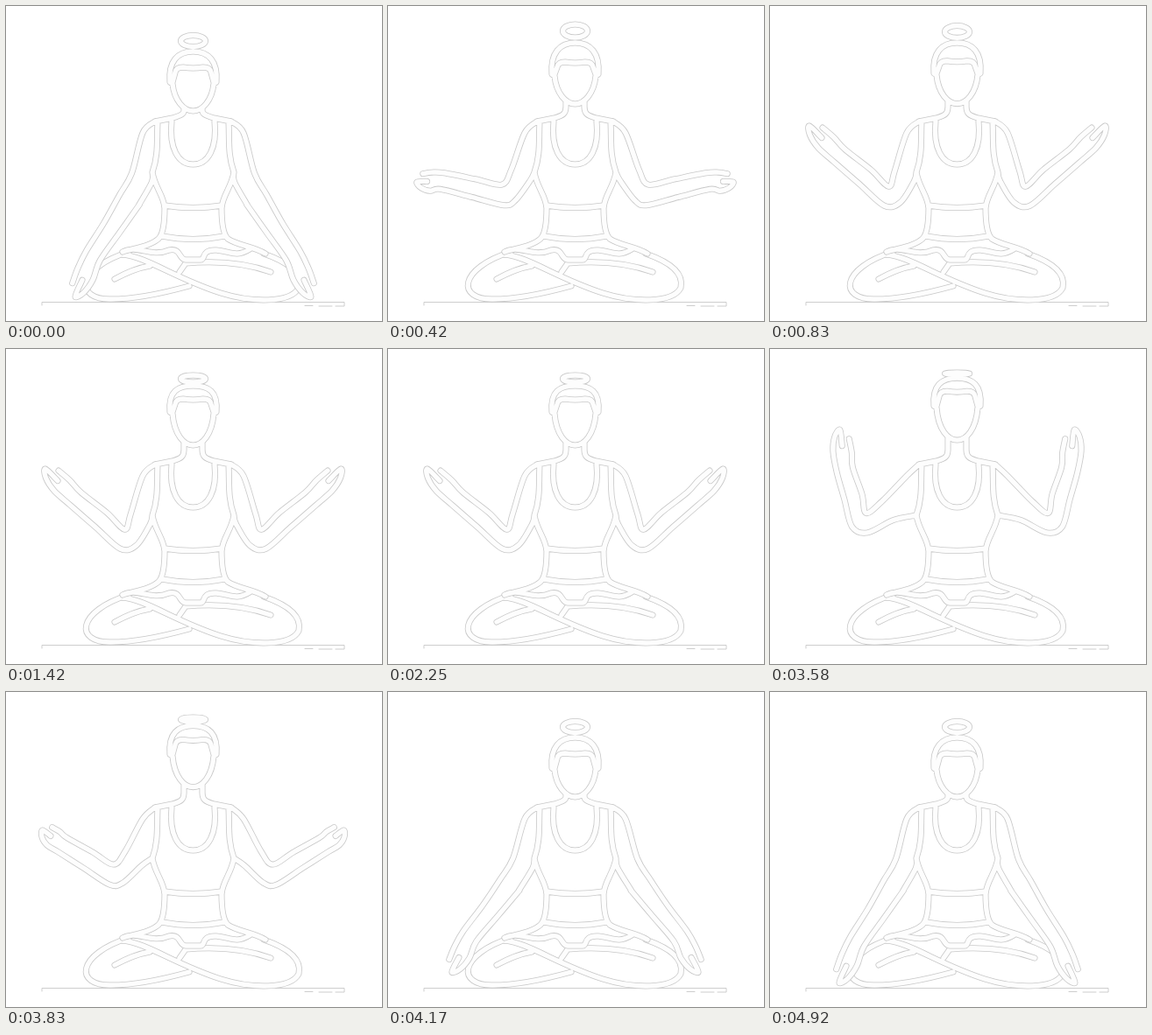
Animation, 429 px wide and 360 px high, one loop 5 s. Source, as an HTML page with a canvas:

```html
<!DOCTYPE html>
<html lang="en">
<head>
<meta charset="utf-8">
<title>Seated meditation</title>
<style>
html, body { margin: 0; width: 100%; height: 100%; overflow: hidden; background: #fff; }
canvas { display: block; }
</style>
</head>
<body>
<canvas id="stage" width="429" height="360"></canvas>
<script>
const ctx = document.getElementById('stage').getContext('2d');
const LOOP = 5000, STEP = LOOP / 60;
const EDGE = '#c8c8c8', FILL = '#fdfdfd';
const MIRROR = new DOMMatrix([-1, 0, 0, 1, 427, 0]);

// Arm poses: elbow, wrist, fingertip.
const lowered = [141,222, 99,285, 79,332];
const resting = [139,221, 93,279, 73,320];
const spread = [135,216, 62,199, 33,200];
const wide = [133,215, 58,199, 29,200];
const open = [138,219, 80,171, 45,137];
const lifted = [104,199, 86,137, 81,91];

// Head poses: bun, bun radius, crown, ear, hairline, chin.
const level = [40, 6.5, 52, 87, 70, 120];
const raised = [28.5, 7.5, 42, 78, 64, 112];
const tilted = [34, 4, 42, 72, 57, 110];
const back = [28, 1, 33, 65, 48, 104];

const armKeys = [[0, lowered], [60, lowered], [420, spread], [650, open], [3000, open],
  [3560, lifted], [3840, wide], [4170, resting], [4600, lowered], [LOOP, lowered]];
const headKeys = [[0, level], [60, level], [420, raised], [580, raised], [1220, tilted],
  [3000, tilted], [3540, back], [4130, level], [LOOP, level]];

// Monotone cubic interpolation: smooth through keys, no overshoot.
function track(keys, time) {
  let k = 0;
  while (time >= keys[k + 1][0]) k++;
  const [t0, a] = keys[k], [t1, b] = keys[k + 1];
  const span = t1 - t0, u = (time - t0) / span;
  const slope = (j, i) => keys[j] && keys[j + 1]
    ? (keys[j + 1][1][i] - keys[j][1][i]) / (keys[j + 1][0] - keys[j][0]) : 0;
  const tangent = (p, q) => p * q > 0 ? 2 * p * q / (p + q) : 0;
  return a.map((v, i) => {
    const s = slope(k, i);
    const m0 = tangent(slope(k - 1, i), s) * span;
    const m1 = tangent(s, slope(k + 1, i)) * span;
    return v + (b[i] - v) * u * u * (3 - 2 * u) + m0 * u * (1 - u) ** 2 - m1 * u * u * (1 - u);
  });
}

// SVG path data for a smooth curve through points.
function curve(points) {
  const at = i => points[Math.min(points.length - 1, Math.max(0, i))];
  let d = `M${points[0]}`;
  for (let i = 0; i < points.length - 1; i++) {
    const near = at(i).map((v, c) => v + (at(i + 1)[c] - at(i - 1)[c]) / 6);
    const far = at(i + 1).map((v, c) => v - (at(i + 2)[c] - at(i)[c]) / 6);
    d += `C${near} ${far} ${at(i + 1)}`;
  }
  return d;
}

// A bone gives points at a share of its length, pushed sideways by an offset.
function bone([x0, y0], [x1, y1]) {
  const dx = x1 - x0, dy = y1 - y0, length = Math.hypot(dx, dy);
  return (share, offset) => [
    x0 + dx * share - dy / length * offset,
    y0 + dy * share + dx / length * offset
  ];
}

function armLines([ex, ey, wx, wy, tx, ty]) {
  const elbow = [ex, ey], wrist = [wx, wy], tip = [tx, ty];
  const upper = bone([167, 162], elbow), fore = bone(elbow, wrist), hand = bone(wrist, tip);
  // Both bones' outer sides meet 13 px from the elbow, on the bisector.
  const a = upper(1, 1), b = fore(0, 1);
  const nx = a[0] + b[0] - 2 * ex, ny = a[1] + b[1] - 2 * ey;
  const reach = 13 / Math.hypot(nx, ny);
  const crook = [ex + nx * reach, ey + ny * reach];
  return {
    outer: [[170, 132], [156, 145], upper(0.55, 10), crook,
      fore(0.5, 10), fore(1, 9), hand(0.4, 10), hand(0.75, 9)],
    inner: [[167, 190], upper(0.55, -15), upper(1, -12), fore(0, -12), fore(0.5, -11),
      fore(1, -10), hand(0.5, -11), hand(0.85, -7), tip, hand(0.6, 0)]
  };
}

function mirrored(d) {
  const path = new Path2D(d);
  path.addPath(new Path2D(d), MIRROR);
  return path;
}

function band(path) {
  for (const [color, width] of [[EDGE, 7], [FILL, 5.4]]) {
    ctx.strokeStyle = color;
    ctx.lineWidth = width;
    ctx.stroke(path);
  }
}

const ground = new Path2D('M41,342V338.5H386V343H376M341,342.5H350M357,343H372');
const legs = new Path2D(
  'M140,281C80,300 78,336 120,335C150,335 180,328 209,320' +
  'M132,284C160,286 190,310 245,328C280,339 325,340 334,322C338,305 320,292 294,283' +
  'M124,312Q146,300 164,297M198,304L205,294C250,290 280,296 302,304');
const sash = new Path2D(
  'M174,266C165,274 150,276 133,281M253,266C265,274 280,274 296,283' +
  'M133,281C150,272 165,288 186,279C200,276 197,290 205,290H222C228,290 222,278 240,279C255,280 262,288 278,278');
const torso = 'M189,132C186,162 196,181 213.5,181' +
  'M173,132C172,155 174,170 167,190C170,208 180,216 181,231C181,245 180,260 174,266' +
  'M181,228Q196,230.5 213.5,230.5M178,263Q196,266.5 213.5,266.5';

function headLines([, , crown, ear, hair, chin]) {
  return `M213.5,${chin}C203,${chin} 192,${chin - 12} 190,${ear + 2}L187,${ear}` +
    `C185,${ear - 24} 196,${crown} 213.5,${crown}` +
    `M190,${ear}L193,${hair + 6}Q194,${hair} 202,${hair}Q208,${hair + 1} 213.5,${hair + 1}` +
    `M203,${chin - 3}V${Math.max(chin, 115)}C203,123 200,125 190,128L170,132`;
}

function draw(time) {
  const head = track(headKeys, time);
  const { outer, inner } = armLines(track(armKeys, time));
  const armArea = curve(outer) + curve([...inner].reverse()).replace('M', 'L') + 'Z';

  const body = mirrored(torso + headLines(head) + curve(outer) + curve(inner));
  body.addPath(sash);
  body.moveTo(227.5, head[0]);
  body.ellipse(213.5, head[0], 14, head[1], 0, 0, 2 * Math.PI);

  ctx.fillStyle = '#fff';
  ctx.fillRect(0, 0, 429, 360);
  ctx.strokeStyle = EDGE;
  ctx.lineWidth = 0.9;
  ctx.stroke(ground);
  band(legs);
  ctx.fill(mirrored(armArea));
  band(body);
}

ctx.lineCap = ctx.lineJoin = 'round';
function tick() {
  draw(Math.floor(performance.now() % LOOP / STEP) * STEP);
  requestAnimationFrame(tick);
}
tick();
</script>
</body>
</html>
```
